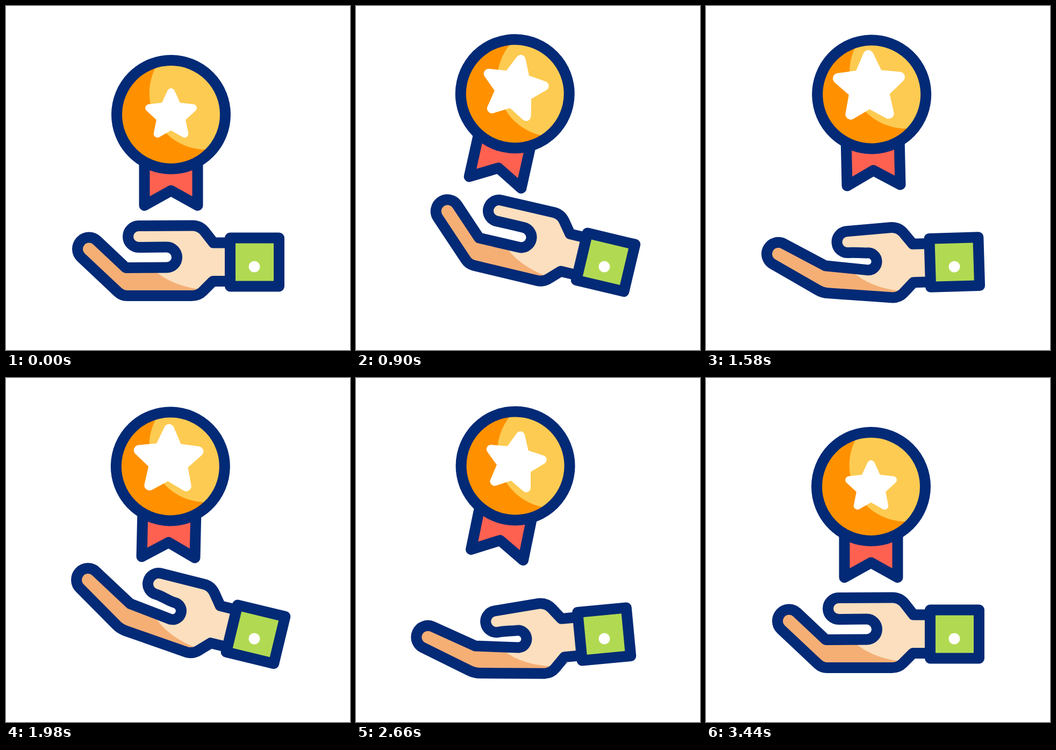
Write an HTML page that moves like this. It is 640 px wide and 640 px high and loops after 3.6 s.

```html
<!DOCTYPE html>
<html lang="en">
<head>
<meta charset="utf-8">
<title>Award in hand</title>
<style>
  html, body { margin: 0; width: 100%; height: 100%; overflow: hidden; background: #fff; }
  svg { display: block; width: 100%; height: 100%; }
  .line { stroke: #032a76; stroke-width: 20; stroke-linejoin: round; stroke-linecap: round; }
</style>
</head>
<body>
<svg viewBox="0 0 640 640">
  <g id="medal">
    <path class="line" fill="#ff6151" d="M257.5 285V371L307 343.5L356.5 371V285Z"/>
    <circle cx="307" cy="202" r="101" fill="#ff9100"/>
    <path fill="#fdcb52" d="M280 111A105 105 0 0 0 372 267L378 273A101 101 0 0 0 278 105Z"/>
    <circle class="line" cx="307" cy="202" r="101" fill="none"/>
    <path id="star" fill="#fff" stroke="#fff" stroke-width="14" stroke-linejoin="round"/>
  </g>
  <g id="arm">
    <path id="skin" fill="#fcdfbe"/>
    <path id="shade" fill="#f5af75"/>
    <path id="outline" class="line" fill="none"/>
    <rect class="line" x="417" y="431.5" width="91" height="90" fill="#b1da52"/>
    <circle cx="462" cy="485" r="10.5" fill="#fff"/>
  </g>
</svg>
<script>
const $ = id => document.getElementById(id);
const LOOP = 3600;
const smooth = x => x * x * (3 - 2 * x);
const linear = x => x;

// Keys are [time, value] pairs.
function track(keys, t, ease = smooth) {
  const i = keys.findIndex(k => k[0] > t);
  if (i === 0) return keys[0][1];
  if (i < 0) return keys[keys.length - 1][1];
  const [t0, a] = keys[i - 1], [t1, b] = keys[i];
  return a + (b - a) * ease((t - t0) / (t1 - t0));
}

const tilt = [[220, 0], [860, 13.7], [1385, -7], [1975, 13.6], [2605, -6], [3020, 6.7], [3440, 0]];
const spread = [[860, 0], [1440, 1], [2680, 1], [3280, 0]];
const lift = [[220, 0], [600, 37.5], [3060, 37.5], [3440, 0]];
const swing = [[592, 0], [992, 14.5], [1392, -14.5], [1792, 14.5], [2192, -14.5],
  [2592, 13.5], [2992, -11], [3392, 0]];
const grow = [[220, 1], [1260, 1.4], [1790, 1.4]];
const shrink = [[1790, 1.4], [3440, 1]];

const starPoints = Array.from({ length: 10 }, (_, i) => {
  const r = i % 2 ? 20.5 : 43, a = i * Math.PI / 5;
  return [307 + r * Math.sin(a), 203 - r * Math.cos(a)];
});
$('star').setAttribute('d', 'M' + starPoints.join('L') + 'Z');

const polar = ([x, y], r, a) => [x + r * Math.cos(a), y + r * Math.sin(a)];
const angle = (p, q) => Math.atan2(q[1] - p[1], q[0] - p[0]);
const dist = (p, q) => Math.hypot(q[0] - p[0], q[1] - p[1]);

function drawHand(p, turn) {
  const right = Math.PI / 2, fr = 21.5, tr = 20;

  const thumb = [247 + 18 * p, 429 + p * (3.5 - 0.35 * turn)];
  const b = angle([thumb[0], thumb[1] - tr], [347, 408.5]);
  const thumbTop = polar(thumb, tr, b - right);
  const thumbBase = polar(thumb, tr, b + right);

  // The gap under the thumb narrows as the hand opens.
  const gr = 19 - 3 * p, gx = 299 + 3 * p, gapTop = [gx, 486.5 - 2 * gr];

  const tip = [154.5 - 19 * p, 452 - 0.6 * p];
  const joint = [223 - p, 487 - 11 * p];
  const a = angle(tip, joint) + Math.asin(fr / dist(tip, joint));
  const tipTop = polar(tip, fr, a - right);
  const tipBase = polar(tip, fr, a + right);
  const heel = [215.5, 539 - 13 * p];
  const heelIn = polar(heel, 10, angle(heel, tipBase));
  const heelOut = polar(heel, 10, angle(heel, [346, 539]));

  const finger = `L${joint}L${tipTop}A${fr} ${fr} 0 0 0 ${tipBase}` +
    `L${heelIn}Q${heel} ${heelOut}L346 539Q358 539 366 531`;
  const hand = `M417 440.5H386L370 420Q361 408.5 347 408.5L${thumbTop}` +
    `A${tr} ${tr} 0 0 0 ${thumbBase}C${polar(thumbBase, 12, b)} ${gx - 12} ${gapTop[1]} ${gapTop}` +
    `A${gr} ${gr} 0 0 1 ${gx} 486.5${finger}L385 512H417`;

  $('skin').setAttribute('d', hand + 'Z');
  $('outline').setAttribute('d', hand);
  $('shade').setAttribute('d', `M366 528Q303 520 271 487${finger}Z`);
}

function draw(now) {
  const t = now % LOOP;
  const turn = track(tilt, t);
  const size = t < 1790 ? track(grow, t) : track(shrink, t, linear);
  $('medal').setAttribute('transform',
    `translate(0 ${-track(lift, t)}) rotate(${track(swing, t)} 307 150)`);
  $('star').setAttribute('transform',
    `translate(318.2 236.7) scale(${size}) translate(-318.2 -236.7)`);
  $('arm').setAttribute('transform', `rotate(${turn} 462 485)`);
  drawHand(track(spread, t), turn);
}

let start;
function tick(now) {
  start ??= now;
  draw(now - start);
  requestAnimationFrame(tick);
}
draw(0);
requestAnimationFrame(tick);
</script>
</body>
</html>
```
